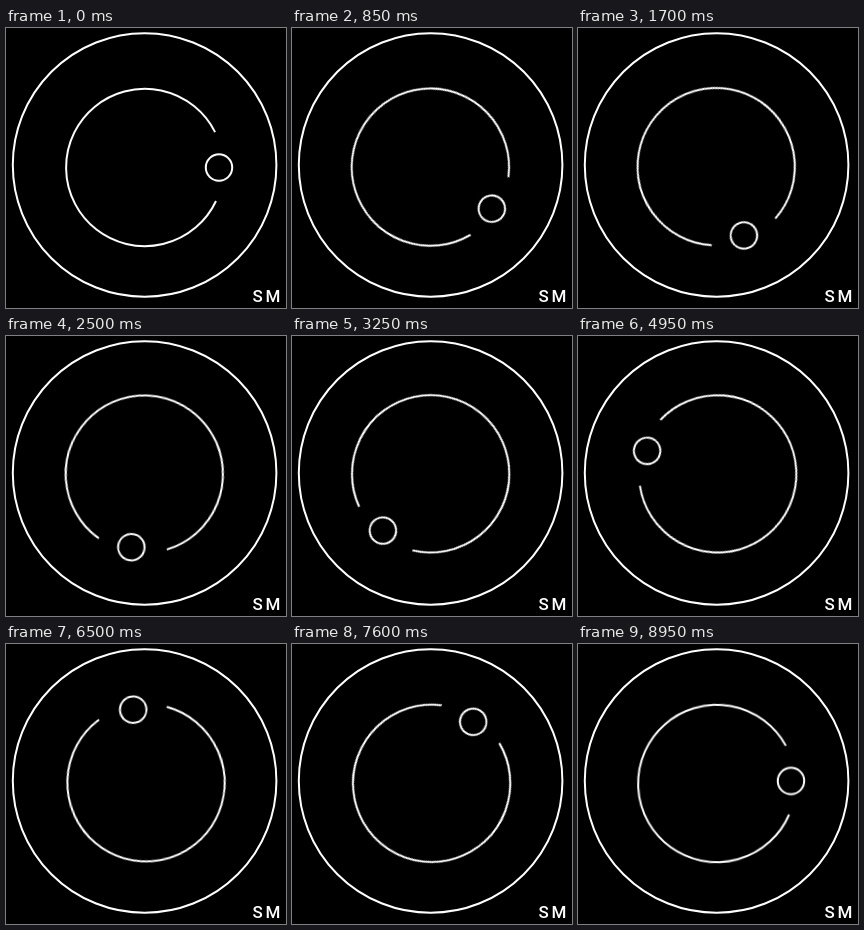
Animation, 280 px wide and 280 px high, one loop 9 s. Source, as an HTML page without scripts:

```html
<!DOCTYPE html>
<html lang="en">
<head>
<meta charset="utf-8">
<title>Orbit</title>
<style>
  html, body {
    margin: 0;
    width: 100%;
    height: 100%;
    overflow: hidden;
    background: #000;
  }
  svg {
    display: block;
    width: 100vw;
    height: 100vh;
  }
  .line {
    fill: none;
    stroke: #fff;
    stroke-width: 2;
  }
  /* The pivot sits slightly off the ring's centre, so the ring wobbles */
  .orbit {
    transform-origin: 139.1px 138.6px;
    animation: turn 9s linear infinite;
  }
  @keyframes turn {
    from { transform: rotate(0deg); }
    to { transform: rotate(360deg); }
  }
  text {
    font: 500 17px Roboto, sans-serif;
    fill: #fff;
  }
</style>
</head>
<body>
<svg viewBox="0 0 280 280">
  <circle class="line" cx="138.6" cy="137" r="131.8"/>
  <g class="line orbit">
    <path d="M210 173A78.7 78.7 0 1 1 209.1 104.1"/>
    <circle cx="213" cy="139.5" r="13.2"/>
  </g>
  <text x="246.5 259.6" y="273.5">SM</text>
</svg>
</body>
</html>
```
